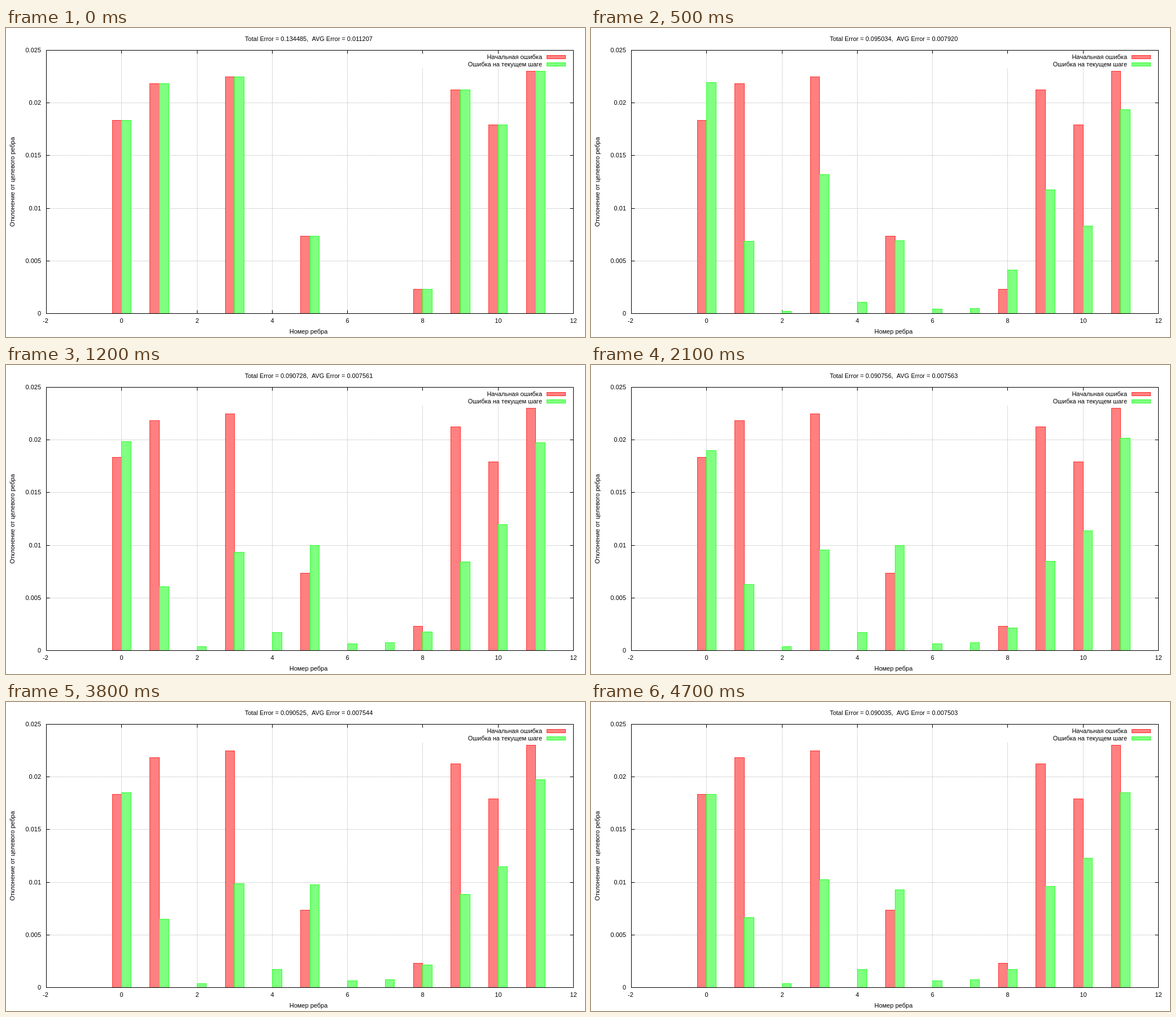
An HTML page with a canvas that plays this animation: 1025x547 px, repeating every 5000 ms.

```html
<!DOCTYPE html>
<html lang="ru">
<head>
<meta charset="utf-8">
<title>Error per edge</title>
<style>
html, body { margin: 0; width: 100%; height: 100%; overflow: hidden; background: #fff; }
canvas { display: block; }
</style>
</head>
<body>
<canvas id="chart" width="1025" height="547"></canvas>
<script>
const ctx = document.getElementById('chart').getContext('2d');
const LOOP = 5000;
const LEFT = 71, RIGHT = 1004, TOP = 39, BOTTOM = 505;
const UNIT = (RIGHT - LEFT) / 14;
const RED = ['#ff3030', '#ff8080'], GREEN = ['#30ff30', '#80ff80'];

// Moments when the solver accepts a step; the chart holds still in between.
const stepTimes = [0, 100, 300, 400, 500, 600, 800, 900, 1000, 1200,
  1500, 1800, 2100, 3400, 3600, 3800, 4100, 4400, 4700];

// Step numbers of the key points, and bar heights there for the large errors.
const keySteps = [0, 2, 4, 9, 12, 18];
const largeBars = {
  0: [342, 346, 409, 370, 354, 342],
  1: [407, 254, 128, 113, 117, 124],
  3: [419, 432, 246, 174, 178, 191],
  5: [137, 121, 129, 186, 186, 173],
  8: [43, 68, 77, 33, 40, 32],
  9: [396, 316, 219, 157, 158, 179],
  10: [334, 149, 155, 223, 212, 229],
  11: [429, 344, 361, 368, 376, 345]
};
const totalError = [134485, 109732, 95034, 90728, 90756, 90035];

// Edges without an initial error rise smoothly to these heights.
const smallBars = { 2: 7, 4: 32, 6: 12, 7: 14 };

const xAt = v => Math.round(LEFT + (v + 2) * UNIT);
const yAt = v => Math.round(BOTTOM - v * (BOTTOM - TOP) / 0.025);
const rise = step => 1 - Math.exp(-((step / 4) ** 2));

// Parabola through the three key points around the step.
function curve(values, step) {
  const first = step < 4 ? 0 : step < 9 ? 2 : 3;
  const window = [first, first + 1, first + 2];
  return window.reduce((sum, i) => sum + window.reduce((product, j) => i === j ? product
    : product * (step - keySteps[j]) / (keySteps[i] - keySteps[j]), values[i]), 0);
}

function line(x1, y1, x2, y2) {
  ctx.beginPath();
  ctx.moveTo(x1 + 0.5, y1 + 0.5);
  ctx.lineTo(x2 + 0.5, y2 + 0.5);
  ctx.stroke();
}

function gridLine(...ends) {
  ctx.strokeStyle = '#909090';
  ctx.setLineDash([1, 2]);
  line(...ends);
  ctx.setLineDash([]);
  ctx.strokeStyle = '#000';
}

function box(x1, y1, x2, y2, [edge, fill]) {
  ctx.fillStyle = fill;
  ctx.strokeStyle = edge;
  ctx.fillRect(x1 + 0.5, y1 + 0.5, x2 - x1, y2 - y1);
  ctx.strokeRect(x1 + 0.5, y1 + 0.5, x2 - x1, y2 - y1);
}

function bar(edge, shift, height, colors) {
  const h = Math.round(height);
  if (h > 0) box(xAt(edge + shift), BOTTOM - h, xAt(edge + shift + 0.25), BOTTOM, colors);
}

function text(str, x, y, align = 'center') {
  ctx.fillStyle = '#000';
  ctx.textAlign = align;
  ctx.fillText(str, x, y);
}

function drawAxes() {
  for (let v = -2; v <= 12; v += 2) {
    const x = xAt(v);
    if (v > -2 && v < 12) {
      gridLine(x, BOTTOM, x, v >= 8 ? 72 : TOP);
      line(x, BOTTOM, x, BOTTOM - 6);
      line(x, TOP, x, TOP + 6);
    }
    text(v, v < 0 ? x - 1 : x + 0.5, 522);
  }
  for (let i = 0; i <= 5; i++) {
    const y = yAt(i * 0.005);
    if (i > 0 && i < 5) {
      gridLine(LEFT, y, RIGHT, y);
      line(LEFT, y, LEFT + 6, y);
      line(RIGHT, y, RIGHT - 6, y);
    }
    text(+(i * 0.005).toFixed(3), 62, y + 4, 'right');
  }
}

function drawBars(step) {
  for (const [edge, heights] of Object.entries(largeBars)) {
    bar(+edge, -0.25, heights[0], RED);
    bar(+edge, 0, curve(heights, step), GREEN);
  }
  for (const [edge, height] of Object.entries(smallBars)) {
    bar(+edge, 0, height * rise(step), GREEN);
  }
}

function drawLabels(step) {
  const total = Math.round(curve(totalError, step));
  const millionths = n => (Math.round(n) / 1e6).toFixed(6);
  text(`Total Error = ${millionths(total)},\u00a0 AVG Error = ${millionths(total / 12)}`, 536, 23);
  text('Номер ребра', 535.5, 541);
  ctx.save();
  ctx.translate(15, 272.5);
  ctx.rotate(-Math.PI / 2);
  text('Отклонение от целевого ребра', 0, 0);
  ctx.restore();
  text('Начальная ошибка', 949, 55, 'right');
  text('Ошибка на текущем шаге', 949, 68, 'right');
  box(957, 48, 990, 54, RED);
  box(957, 61, 990, 67, GREEN);
}

function draw(time) {
  const step = stepTimes.filter(t => t <= time).length - 1;
  ctx.fillStyle = '#fff';
  ctx.fillRect(0, 0, 1025, 547);
  ctx.lineWidth = 1;
  ctx.font = '11px "Liberation Sans", Arial, sans-serif';
  drawAxes();
  drawBars(step);
  drawLabels(step);
  ctx.strokeStyle = '#000';
  ctx.strokeRect(LEFT + 0.5, TOP + 0.5, RIGHT - LEFT, BOTTOM - TOP);
}

const start = performance.now();
function tick() {
  draw((performance.now() - start) % LOOP);
  requestAnimationFrame(tick);
}
tick();
</script>
</body>
</html>
```
